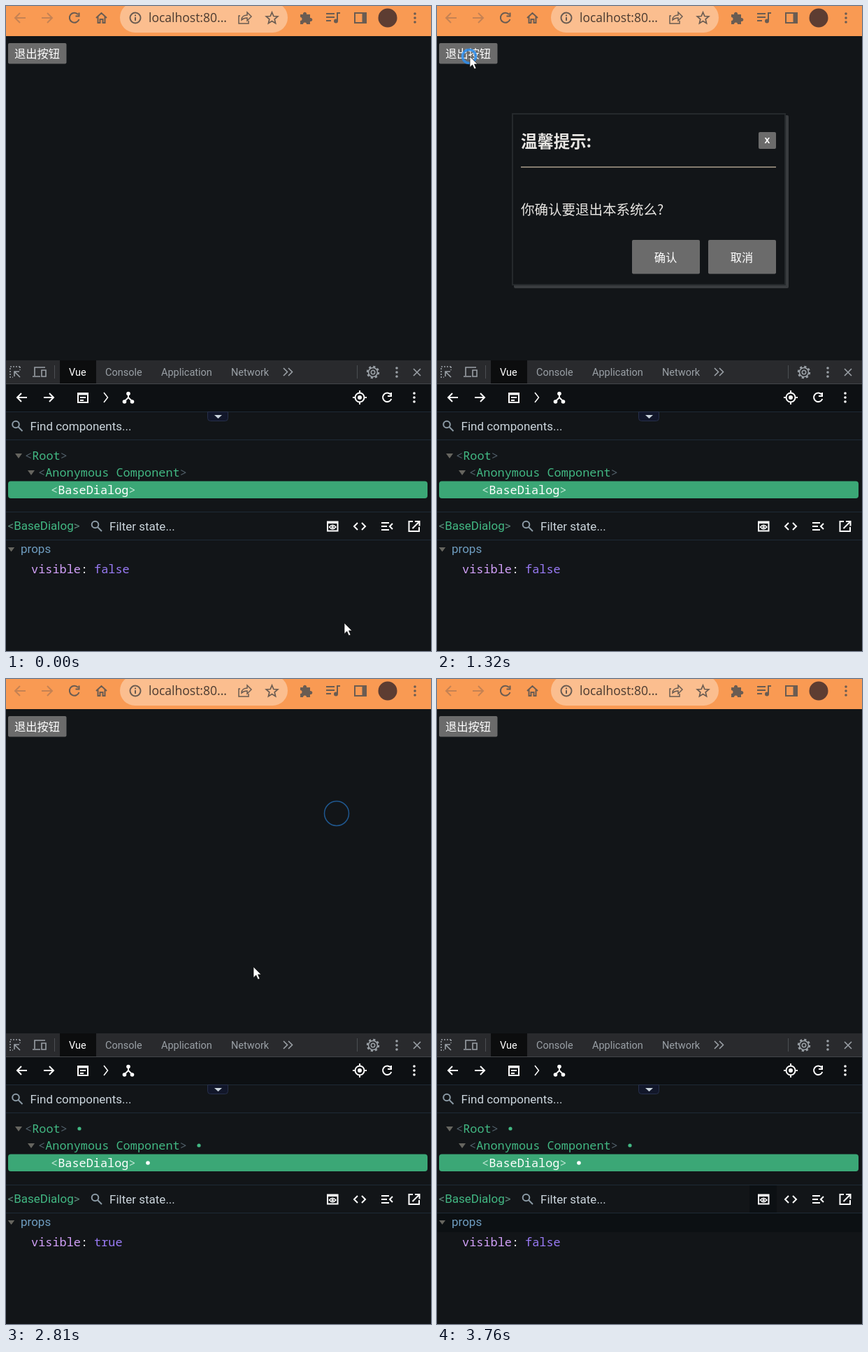
Recreate the animation shown at these times as an HTML page. Size 608x921 px, loop 4050 ms.

```html
<!DOCTYPE html>
<html lang="zh">
<head>
<meta charset="utf-8">
<title>Dialog demo</title>
<style>
html, body { margin: 0; width: 100%; height: 100%; overflow: hidden; background: #121518; }
svg { display: block; width: 608px; height: 921px; }
text { white-space: pre; }
.cjk { font-family: "Noto Sans CJK SC", "Noto Sans CJK", sans-serif; font-size: 16.3px; fill: #fff; }
.ui { font: 17px Roboto, sans-serif; fill: #cbd5dc; }
.tab { font: 14.5px Roboto, sans-serif; fill: #9aa0a6; }
.mono { font: 16.9px "Noto Sans Mono", monospace; fill: #42b883; }
.tip { font: 14.5px "Liberation Mono", monospace; fill: #777c80; }
.mid { text-anchor: middle; }
.dim { fill: #52616b; }
.line { fill: none; stroke-width: 2; }
.top { stroke: #6a5c52; }
.dev { stroke: #9aa0a6; stroke-width: 1.6; }
.white { stroke: #fff; }
.rule { stroke: #1e2a36; stroke-width: 1; }
</style>
</head>
<body>
<svg viewBox="0 0 608 921">
  <rect width="608" height="921" fill="#121518"/>

  <!-- browser bar -->
  <rect width="608" height="43" fill="#f99a53"/>
  <rect x="163" y="-5" width="240" height="43" rx="21.5" fill="#fbbe8f"/>
  <g class="line top">
    <path stroke="#c58253" d="M28 17H13m7-7-7 7 7 7M51 17h15m-7-7 7 7-7 7"/>
    <path d="M103 12a7 7 0 1 0 1.500 7M104.500 9.500v5h-5"/>
    <path d="M129 17l7.500-7 7.500 7M131.500 15v9h3v-5h4v5h3v-9"/>
    <circle cx="185" cy="17" r="7.500"/>
    <path d="M185 16v5m0-8.500v2"/>
    <path stroke-width="1.500" d="M335 14h-2v11h14v-4M337 20c0-5 4-7 8-7V9l6 6-6 6v-4c-4 0-6 1-8 3Z"/>
    <path stroke-width="1.700" d="M380.500 9l2.300 5.500 6 .5-4.600 3.900 1.400 5.800-5.100-3.100-5.100 3.100 1.400-5.800-4.600-3.900 6-.5Z"/>
    <path d="M458 11h12m-12 5h12m-12 5h7M474 21V10h4"/>
    <circle cx="472" cy="21.500" r="2" fill="#6a5c52"/>
    <path d="M499 10h16v14h-16Z"/>
    <path stroke-width="5" d="M512 10v14"/>
  </g>
  <path fill="#6a5c52" d="M421 12h4a2.600 2.600 0 1 1 5 0h5v5a2.600 2.600 0 1 1 0 5v4h-5a2.500 2.500 0 0 0-5 0h-4v-5a2.500 2.500 0 0 0 0-5Z"/>
  <circle cx="546" cy="17" r="13.500" fill="#5d3d32"/>
  <g fill="#6a5c52"><circle cx="585" cy="11" r="1.800"/><circle cx="585" cy="17" r="1.800"/><circle cx="585" cy="23" r="1.800"/></g>
  <text x="204" y="23" style="font:17.5px 'Open Sans',sans-serif" fill="#4a3a30">localhost:80...</text>

  <!-- page -->
  <rect x="3" y="53" width="83.500" height="29.500" rx="2" fill="#6b6b6b"/>
  <text class="cjk" x="12" y="74">退出按钮</text>
  <g id="highlight">
    <rect x="3" y="53" width="600" height="29.500" rx="3" fill="#42b883" opacity=".3"/>
    <rect x="3.500" y="84" width="300" height="27.500" rx="3" fill="#121518" stroke="#33594b"/>
    <text class="tip" x="13" y="103">&lt;<tspan fill="#42e59a" font-weight="bold">Anonymous Component</tspan>&gt;</text>
    <text class="tip" x="203" y="103" style="font-size:13.2px">493.6</text>
    <path d="M247 94l8 8m0-8-8 8" stroke="#777c80"/>
    <text class="tip" x="262" y="103" style="font-size:13.2px">23.6</text>
  </g>
  <g id="dialog">
    <rect x="110" y="156" width="393" height="247" rx="2" fill="#393c3f"/>
    <rect x="107" y="153" width="392" height="246" fill="#25292c"/>
    <rect x="109" y="155" width="388" height="242" fill="#121518"/>
    <text class="cjk" x="120" y="201.500" style="font-size:23.4px;font-weight:bold;fill:#e8e6e3">温馨提示:</text>
    <rect x="460" y="180" width="25" height="24" rx="2" fill="#6b6b6b"/>
    <text class="mid" x="472.500" y="196" style="font:bold 14px 'Liberation Sans',sans-serif" fill="#fff">x</text>
    <rect x="120" y="229" width="365" height="2" fill="#857c6f"/>
    <text class="cjk" x="120" y="298" style="font-size:19.5px;fill:#e8e6e3">你确认要退出本系统么?</text>
    <rect x="279" y="334" width="97" height="48.500" rx="2" fill="#6b6b6b"/>
    <rect x="388" y="334" width="97" height="48.500" rx="2" fill="#6b6b6b"/>
    <text class="cjk mid" x="327" y="365">确认</text>
    <text class="cjk mid" x="436" y="365">取消</text>
  </g>

  <!-- devtools tabs -->
  <rect y="506" width="608" height="34" fill="#292a2d"/>
  <rect x="77" y="506" width="52" height="33" fill="#0c0d0e"/>
  <path d="M0 539.500h608" stroke="#43464a"/>
  <path d="M69.500 513v19M502.500 513v19" stroke="#4b4e52"/>
  <text class="tab" x="90" y="528" style="fill:#fff">Vue</text>
  <text class="tab" x="142" y="528">Console</text>
  <text class="tab" x="222" y="528">Application</text>
  <text class="tab" x="322" y="528">Network</text>
  <g class="line dev">
    <path stroke-dasharray="2 2" d="M20 515H6v15h4M20 515v5"/>
    <path d="M20 530l-8-8m0 7v-7h7"/>
    <path d="M56 516H41v12m-3 1h11M51 520h6v9h-6Z"/>
    <path d="M397 517l5.500 5.500-5.500 5.500m7-11 5.500 5.500-5.500 5.500"/>
    <circle cx="525" cy="523" r="2.700"/><circle cx="525" cy="523" r="6.500"/>
    <circle cx="525" cy="523" r="8" stroke-width="2.500" stroke-dasharray="3.140 3.140"/>
    <path d="M583 518l10 10m0-10-10 10"/>
  </g>
  <g fill="#9aa0a6"><circle cx="559" cy="517" r="1.800"/><circle cx="559" cy="523" r="1.800"/><circle cx="559" cy="529" r="1.800"/></g>

  <!-- toolbar -->
  <rect y="540" width="608" height="39" fill="#0d1013"/>
  <path class="rule" d="M0 579.500h608M0 619.500h608M0 722.500h608M0 762.500h608"/>
  <g class="line white">
    <path d="M30 559H16m6-6-6 6 6 6M54 559h14m-6-6 6 6-6 6"/>
    <path d="M103 553h14v13h-14Zm0 1.500h14M106 559h8m-8 4h5"/>
    <path stroke-width="1.500" d="M140 552l5.500 7-5.500 7"/>
    <path d="M175 553v6l-6 6m6-6 6 6"/>
    <circle cx="506" cy="559" r="6.500"/><path d="M506 549v4m0 12v4m-10-10h4m12 0h4"/>
    <path d="M550 554.500a6.300 6.300 0 1 0 1.300 6.500M551 552v5h-5"/>
  </g>
  <g fill="#fff">
    <circle cx="175" cy="553.500" r="2.800"/><circle cx="169.500" cy="565" r="2.800"/><circle cx="180.500" cy="565" r="2.800"/>
    <circle cx="506" cy="559" r="3"/>
    <circle cx="584" cy="553" r="1.800"/><circle cx="584" cy="559" r="1.800"/><circle cx="584" cy="565" r="1.800"/>
  </g>
  <path d="M288.500 579.500h29v9q0 4-4 4h-21q-4 0-4-4Z" fill="#12172a" stroke="#27304a"/>
  <path d="M298 584h11l-5.500 5Z" fill="#cbd5dc"/>

  <!-- component tree -->
  <g class="line" stroke="#8b9aa5">
    <circle cx="14" cy="597.500" r="4.800"/><path d="M17.500 601l6 6"/>
    <circle cx="127.500" cy="740.500" r="4.800"/><path d="M131 744l6 6"/>
  </g>
  <text class="ui" x="34.500" y="606">Find components...</text>
  <path d="M13 639h10l-5 7ZM31 663h10l-5 7ZM3 773h9l-4.500 6Z" fill="#66655f"/>
  <rect x="3" y="678.500" width="600" height="24.500" rx="4" fill="#3ba776"/>
  <text class="mono" x="27" y="648"><tspan class="dim">&lt;</tspan>Root<tspan class="dim">&gt;</tspan></text>
  <text class="mono" x="46" y="672"><tspan class="dim">&lt;</tspan>Anonymous Component<tspan class="dim">&gt;</tspan></text>
  <text class="mono" x="64" y="697" style="fill:#fff;font-weight:500"><tspan fill="#c3e8d7">&lt;</tspan>BaseDialog<tspan fill="#c3e8d7">&gt;</tspan></text>
  <g id="dots" fill="#42b883">
    <circle cx="105" cy="642" r="2.600"/><circle cx="276" cy="666" r="2.600"/><circle cx="203" cy="691" r="2.800" fill="#fff"/>
  </g>

  <!-- state inspector -->
  <path id="shade" d="M447 723h39v39h-39ZM0 763h608v27H0Z" fill="#0c1013"/>
  <text class="ui" x="2.500" y="748" style="fill:#42b883"><tspan fill="#5c8578">&lt;</tspan>BaseDialog<tspan fill="#5c8578">&gt;</tspan></text>
  <text class="ui" x="148" y="749">Filter state...</text>
  <g class="line white">
    <path d="M460 736.500h14.500v13H460Zm0 1.500h14.500"/>
    <path stroke-width="1.500" d="M462.500 744q4.700-5.500 9.400 0-4.700 5.500-9.400 0Z"/>
    <path d="M503 738l-5 5 5 5m6-10 5 5-5 5"/>
    <path d="M537 738h11m-11 5h8m-8 5h11m5-9-4 4 4 4"/>
    <path d="M582 736h-5.500v14H591v-6M585 736h6.500v6.500m0-6.500-10 10"/>
  </g>
  <circle cx="467.200" cy="744" r="1.800" fill="#fff"/>
  <path d="M3 773h9l-4.500 6Z" fill="#66655f"/>
  <text class="ui" x="21" y="781" style="fill:#6f9dc0">props</text>
  <text class="mono" x="36" y="810" style="fill:#d3a1fb">visible<tspan fill="#fff">:</tspan></text>
  <text class="mono" id="value" x="126" y="810" style="fill:#9a7bf6"></text>

  <circle id="ripple" fill="none" stroke="#2b8ef0"/>
  <path id="arrow" d="M0 0V15.500L3.700 12 6.500 18 9 17 6.500 11H11Z" fill="#fff" stroke="#111" stroke-width=".7"/>
  <path id="hand" d="M-2 1.500Q0-1 2 1.500V8Q4 6.500 5.500 8.500 7.500 7.500 8.500 9.500 11 9 11 12V16Q11 18 9 22H0L-5.500 14Q-6 11-2 13Z" fill="#fff" stroke="#111" stroke-width=".8"/>
</svg>
<script>
const LOOP = 4050;
const el = id => document.getElementById(id);

// Pointer stops: time, x, y
const path = [
  [0, 484, 881], [60, 426, 661], [140, 231, 431], [200, 123, 345], [280, 75, 280],
  [340, 51, 224], [420, 51, 157], [480, 46, 118], [560, 46, 104], [640, 46, 85],
  [800, 47, 78], [860, 47, 72], [1540, 108, 163], [1620, 170, 163], [1700, 295, 184],
  [1780, 400, 215], [1840, 467, 212], [1920, 487, 195], [2080, 478, 193], [2140, 473, 192],
  [2740, 454, 236], [2810, 354, 411], [2880, 312, 429], [2960, 246, 419], [3030, 199, 385],
  [3170, 180, 385], [3250, 438, 683], [3330, 468, 740], [3390, 476, 787], [3470, 513, 829],
  [3530, 572, 890], [3610, 594, 913]
];
const clicks = [[1250, 46, 72], [2580, 473, 192]];

const within = (t, from, to) => t >= from && t < to;
const show = (id, on) => { el(id).style.display = on ? "" : "none"; };

function drawPointer(t) {
  const [, x, y] = path.findLast(stop => stop[0] <= t);
  const hand = within(t, 60, 140) || within(t, 1920, 2740) || within(t, 3250, 3470);
  show("hand", hand);
  show("arrow", !hand && t < 3760);
  el(hand ? "hand" : "arrow").setAttribute("transform", `translate(${x} ${y})`);
}

function drawRipple(t) {
  const click = clicks.find(c => within(t, c[0], c[0] + 450));
  show("ripple", click);
  if (!click) return;
  const step = Math.floor((t - click[0] + 5) / 75);
  const attrs = {
    cx: click[1], cy: click[2], r: 5.5 + 4 * step,
    "stroke-width": Math.max(1.5, 5 - 1.5 * step), opacity: 1 - step * 0.15
  };
  for (const name in attrs) el("ripple").setAttribute(name, attrs[name]);
}

function draw(t) {
  show("highlight", within(t, 140, 280));
  show("dialog", within(t, 1320, 2660));
  show("dots", t >= 1400);
  show("shade", t >= 3390);
  el("value").textContent = within(t, 1780, 3170) ? "true" : "false";
  drawRipple(t);
  drawPointer(t);
}

const start = performance.now();
function tick() {
  draw((performance.now() - start) % LOOP);
  requestAnimationFrame(tick);
}
tick();
</script>
</body>
</html>
```
